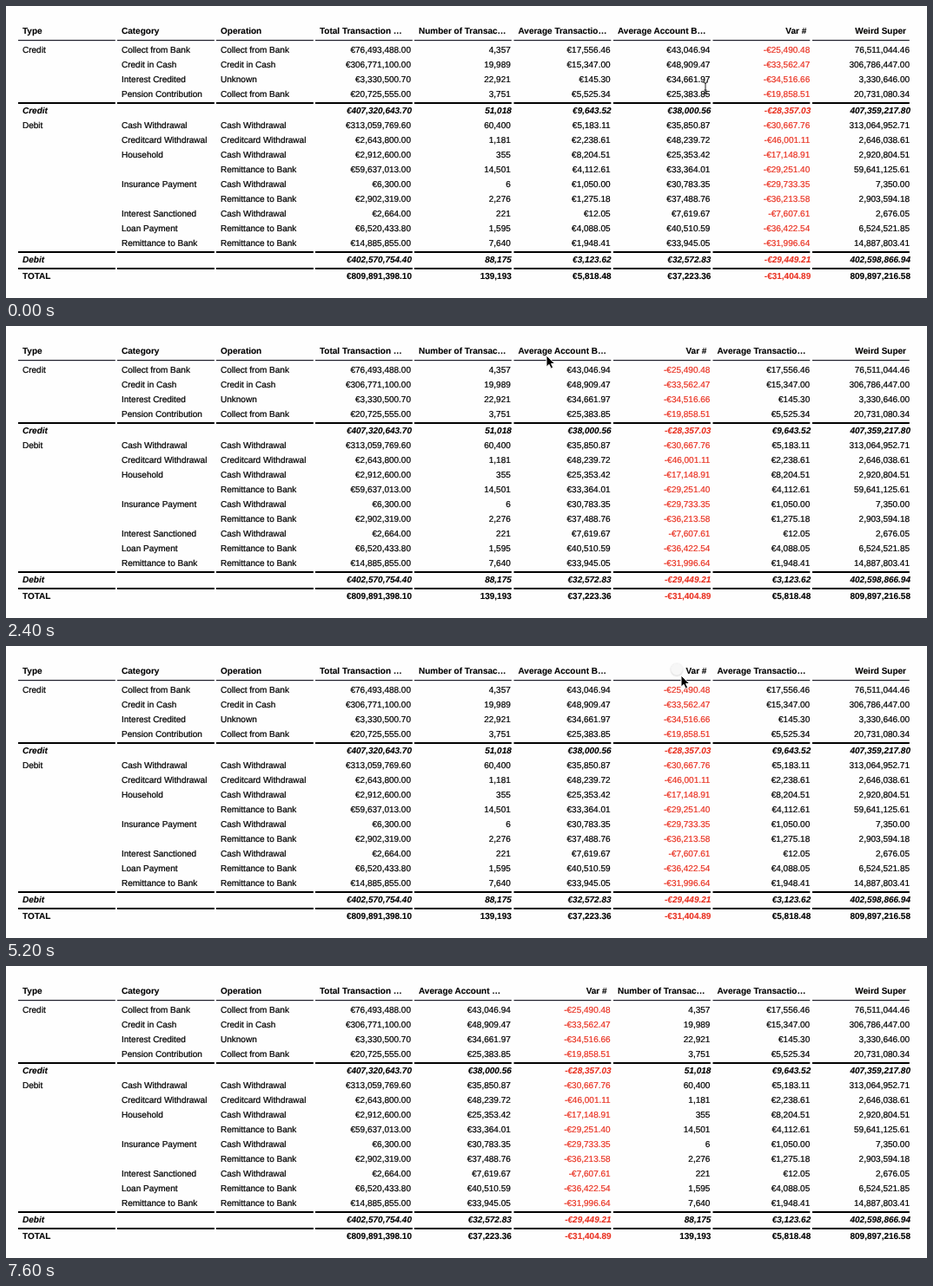
Animation of 1060x337 px, one loop 7800 ms. Source, as an HTML page:

```html
<!DOCTYPE html>
<html>
<head>
<meta charset="utf-8">
<style>
html, body { margin: 0; width: 100%; height: 100%; overflow: hidden; background: #fefefe; }
svg { display: block; }
text {
  font: 10px "Liberation Sans", Arial, sans-serif; text-rendering: geometricPrecision;
  white-space: pre; cursor: default; stroke: #000; stroke-width: .22px;
}
.bold { font-weight: bold; stroke-width: .1px; }
.italic { font-style: italic; }
.red { fill: #ea3323; stroke: #ea3323; }
.right { text-anchor: end; }
</style>
</head>
<body>
<svg width="1060" height="337" viewBox="0 0 1060 337">
  <defs>
    <filter id="soft" x="-50%" y="-50%" width="200%" height="200%">
      <feDropShadow dx="0" dy="0.5" stdDeviation="1.2" flood-color="#000" flood-opacity=".35"/>
    </filter>
  </defs>
  <g id="table"></g>
  <circle id="ghost" r="6.5" fill="#f6f6f6" opacity=".85" filter="url(#soft)"/>
  <path id="arrow" d="M0 0V13.2L3.1 10.4L5.2 15.2L7.7 14.1L5.6 9.5H9.8Z" stroke="#fff" stroke-linejoin="round"/>
  <path id="beam" d="M-2.5 -7Q0 -7 0 -5Q0 -7 2.5 -7M0 -5V5M-2.5 7Q0 7 0 5Q0 7 2.5 7M-1.5 2H1.5" fill="none" stroke="#222"/>
</svg>
<script>
// A leading * marks a subtotal row, # the grand total.
const ROWS = `
Credit|Collect from Bank|Collect from Bank|€76,493,488.00|4,357|€17,556.46|€43,046.94|-€25,490.48|76,511,044.46
|Credit in Cash|Credit in Cash|€306,771,100.00|19,989|€15,347.00|€48,909.47|-€33,562.47|306,786,447.00
|Interest Credited|Unknown|€3,330,500.70|22,921|€145.30|€34,661.97|-€34,516.66|3,330,646.00
|Pension Contribution|Collect from Bank|€20,725,555.00|3,751|€5,525.34|€25,383.85|-€19,858.51|20,731,080.34
*Credit|||€407,320,643.70|51,018|€9,643.52|€38,000.56|-€28,357.03|407,359,217.80
Debit|Cash Withdrawal|Cash Withdrawal|€313,059,769.60|60,400|€5,183.11|€35,850.87|-€30,667.76|313,064,952.71
|Creditcard Withdrawal|Creditcard Withdrawal|€2,643,800.00|1,181|€2,238.61|€48,239.72|-€46,001.11|2,646,038.61
|Household|Cash Withdrawal|€2,912,600.00|355|€8,204.51|€25,353.42|-€17,148.91|2,920,804.51
||Remittance to Bank|€59,637,013.00|14,501|€4,112.61|€33,364.01|-€29,251.40|59,641,125.61
|Insurance Payment|Cash Withdrawal|€6,300.00|6|€1,050.00|€30,783.35|-€29,733.35|7,350.00
||Remittance to Bank|€2,902,319.00|2,276|€1,275.18|€37,488.76|-€36,213.58|2,903,594.18
|Interest Sanctioned|Cash Withdrawal|€2,664.00|221|€12.05|€7,619.67|-€7,607.61|2,676.05
|Loan Payment|Remittance to Bank|€6,520,433.80|1,595|€4,088.05|€40,510.59|-€36,422.54|6,524,521.85
|Remittance to Bank|Remittance to Bank|€14,885,855.00|7,640|€1,948.41|€33,945.05|-€31,996.64|14,887,803.41
*Debit|||€402,570,754.40|88,175|€3,123.62|€32,572.83|-€29,449.21|402,598,866.94
#TOTAL|||€809,891,398.10|139,193|€5,818.48|€37,223.36|-€31,404.89|809,897,216.58`.trim().split('\n');

const HEADERS = ['Type', 'Category', 'Operation', 'Total Transaction …', 'Number of Transac…',
  'Average Transactio…', 'Average Account B…', 'Var #', 'Weird Super'];
const RULE_WIDTH = 111.8, DURATION = 7800, STEP = 200;
const ACCOUNT = 6, VAR = 7;

// Column order from each time on.
const ORDERS = [
  [0, [0, 1, 2, 3, 4, 5, 6, 7, 8]],
  [1600, [0, 1, 2, 3, 4, 6, 7, 5, 8]],
  [5400, [0, 1, 2, 3, 6, 7, 4, 5, 8]]
];
// Pointer path: time, x, y.
const PATH = [[0, 805, 95], [800, 650, 28], [1400, 761, 25], [1600, 761, 26], [2400, 622, 34],
  [3600, 534, 27], [4000, 534, 27], [5200, 777, 34], [5400, 777, 34], [6800, 900, 350], [7800, 900, 350]];
const DRAGS = [[1000, 1400], [4200, 5200]];

const $ = id => document.getElementById(id);
const leftEdge = slot => 14 + 114 * slot + Math.max(0, slot - 4) * 0.5;
const rightEdge = slot => 466 + 114.8 * (slot - 3);

function add(parent, tag, attributes, content = '') {
  const node = document.createElementNS('http://www.w3.org/2000/svg', tag);
  for (const name in attributes) node.setAttribute(name, attributes[name]);
  node.textContent = content;
  return parent.appendChild(node);
}

const move = (node, x, y = 0) => node.setAttribute('transform', `translate(${x} ${y})`);

// Each column has parts tied to its left edge and parts tied to its right edge.
const columns = HEADERS.map((header, i) => {
  const left = add($('table'), 'g', {}), right = add($('table'), 'g', {});
  const label = i < VAR
    ? add(left, 'text', { class: 'bold', x: 5, y: 32 }, header)
    : add(right, 'text', { class: 'bold right', x: -4, y: 32 }, header);
  add(left, 'rect', { y: 39, width: RULE_WIDTH, height: 1.2, fill: '#1c1c28' });
  const numeric = i > 2;
  let y = 37;
  for (const row of ROWS) {
    const mark = /^[*#]/.test(row) ? row[0] : '';
    y += mark ? 19 : 17;
    if (mark) add(left, 'rect', { y: y - 13, width: RULE_WIDTH, height: 2 });
    const styles = [mark && 'bold', mark === '*' && 'italic', numeric && 'right', i === VAR && 'red'];
    const x = !numeric ? 5 : mark ? 1 : 0;
    add(numeric ? right : left, 'text', { class: styles.filter(Boolean).join(' '), x, y },
      row.slice(mark.length).split('|')[i]);
  }
  return { left, right, label };
});

function pointerAt(t) {
  const next = Math.max(1, PATH.findIndex(key => key[0] > t));
  const [t0, x0, y0] = PATH[next - 1], [t1, x1, y1] = PATH[next];
  const p = (t - t0) / (t1 - t0), ease = p * p * (3 - 2 * p);
  return [x0 + (x1 - x0) * ease, y0 + (y1 - y0) * ease];
}

function place(id, x, y, visible) {
  move($(id), x, y);
  $(id).style.display = visible ? '' : 'none';
}

function draw(now) {
  const t = Math.floor(now % DURATION / STEP) * STEP;
  const order = ORDERS.filter(([start]) => t >= start).pop()[1];
  order.forEach((column, slot) => {
    move(columns[column].left, leftEdge(slot));
    move(columns[column].right, rightEdge(slot));
  });
  columns[ACCOUNT].label.textContent = order[4] === ACCOUNT ? 'Average Account …' : HEADERS[ACCOUNT];

  const [x, y] = pointerAt(t);
  const overText = y > 42;
  place('arrow', x, y, !overText);
  place('beam', x, y, overText);
  place('ghost', x - 5, y - 7, DRAGS.some(([start, end]) => t >= start && t <= end));
  requestAnimationFrame(draw);
}
requestAnimationFrame(draw);
</script>
</body>
</html>
```
